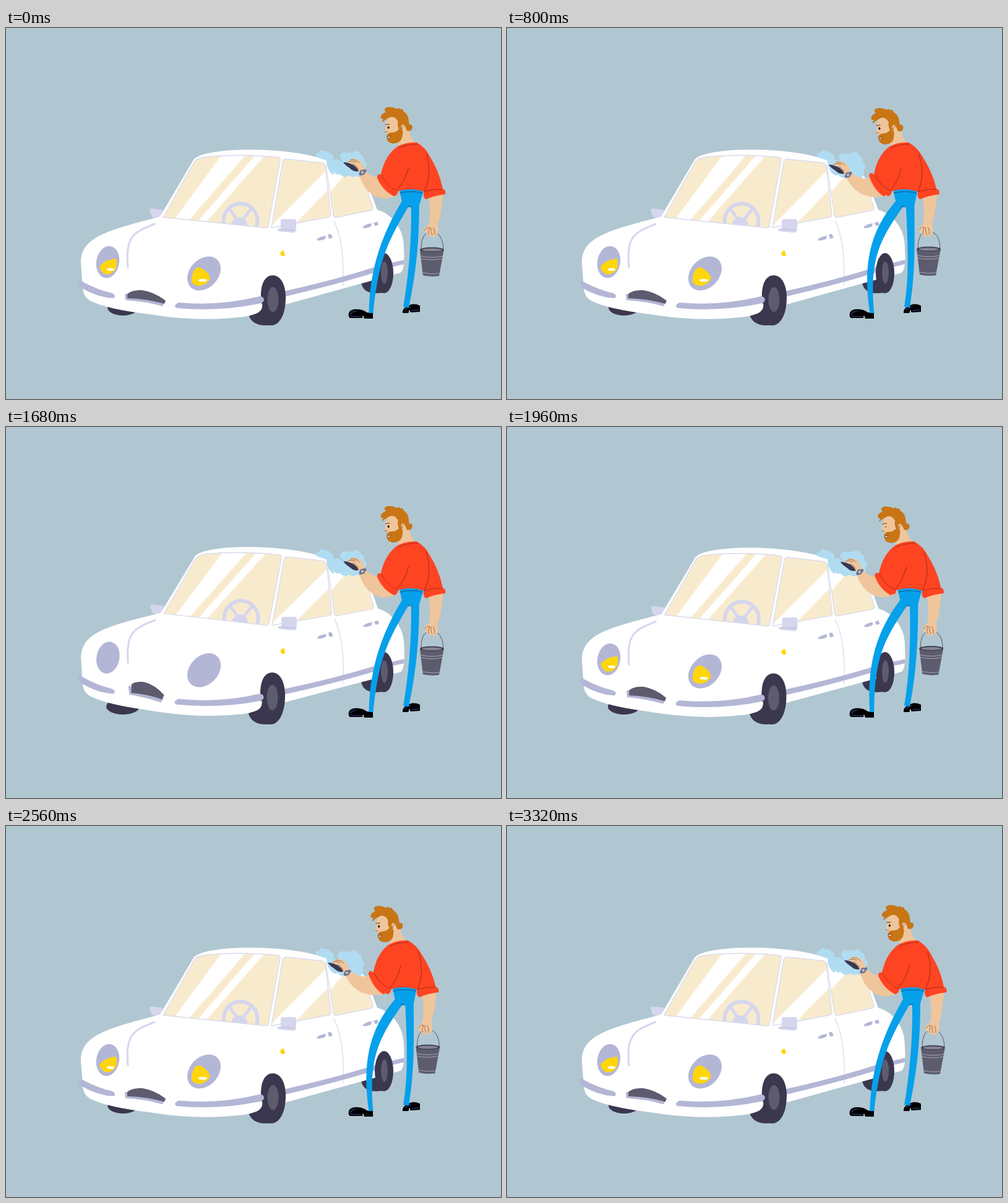
These frames come from a looping animation (800x600 px, 3360 ms). An HTML page:

```html
<!DOCTYPE html>
<html lang="en">
<head>
<meta charset="utf-8">
<title>Car wash</title>
<style>
html, body { margin: 0; width: 100%; height: 100%; overflow: hidden; background: #b0c7d2; }
svg { display: block; width: 100vw; height: 100vh; }
.line { fill: none; stroke-linecap: round; stroke-linejoin: round; }
.tan { fill: #f8ebcd; }
.edge { stroke: #d9daee; stroke-width: 1.3; stroke-linejoin: round; }
.lav { fill: #b4b6d6; }
.pale { fill: #d5d6ee; }
.tire { fill: #3a374e; }
.hub { fill: #5d5b6e; }
.skin { fill: #efc59c; }
.hair { fill: #c87516; }
.fold { stroke: #8f2413; stroke-width: .8; }
.crease { stroke: #8a5a3a; stroke-width: .8; }
</style>
</head>
<body>
<svg viewBox="0 0 800 600">
  <defs>
    <clipPath id="glass"><path d="M254 306 L304 217 Q308 211 320 209 Q375 203 439 209 Q444 210 443 214 L424 320 Q423 324 419 323 Z"/></clipPath>
    <clipPath id="side"><path d="M453 212 L510 218 Q515 219 516 224 L525 301 Q525 305 521 306 L429 323 L447 217 Q448 212 453 212 Z"/></clipPath>
    <clipPath id="rear"><path d="M517 222 L572 241 Q577 243 579 248 L593 290 Q593 294 589 295 L535 306 Q530 307 529 302 Z"/></clipPath>
  </defs>
  <rect width="800" height="600" fill="#b0c7d2"/>

  <!-- car -->
  <ellipse id="farWheel" class="tire" cx="189" cy="452" rx="25" ry="13"/>
  <path class="tire" d="M574 412 Q577 429 598 429 L613 428 L613 395 Z"/>
  <path class="tire" d="M391 460 Q395 481 420 481 L434 480 L432 440 Z"/>
  <g class="car">
    <path class="pale" d="M232 295 Q232 292 236 292 L254 294 L250 307 L236 306 Z"/>
    <path fill="#fff" d="M121 380 C121 338 162 328 249 305 L302 215 C308 199 376 194 432 198 Q478 201 518 213 L568 232 Q582 240 588 262 L600 294 Q622 300 635 323 Q643 336 643 358 Q645 392 637 396 L452 447 L414 452 Q409 463 385 467 Q310 476 232 463 Q165 455 138 442 Q125 436 124 420 Z"/>
    <g clip-path="url(#glass)">
      <path class="tan" d="M240 190H460V340H240Z"/>
      <path fill="#fff" d="M351 202 L390 202 L294 313 L271 311 Z M406 202 L421 203 L320 318 L307 316 Z"/>
      <g class="line" stroke="#d5d6ee" stroke-width="6">
        <ellipse cx="379" cy="312" rx="27.500" ry="28"/>
        <path d="M375 312 L362 294 M381 312 L396 293" stroke-width="5"/>
      </g>
      <circle class="pale" cx="377" cy="319" r="13"/>
    </g>
    <path class="line edge" d="M254 306 L304 217 Q308 211 320 209 Q375 203 439 209 Q444 210 443 214 L424 320 Q423 324 419 323 Z"/>
    <g clip-path="url(#side)">
      <path class="tan" d="M420 200H530V330H420Z"/>
      <path fill="#fff" d="M518 230 L524 258 L466 318 L425 324 Z"/>
    </g>
    <path class="line edge" d="M453 212 L510 218 Q515 219 516 224 L525 301 Q525 305 521 306 L429 323 L447 217 Q448 212 453 212 Z"/>
    <g clip-path="url(#rear)">
      <path class="tan" d="M510 210H600V310H510Z"/>
      <path fill="#fff" d="M512 215 L568 215 L523 266 Z"/>
    </g>
    <path class="line edge" d="M517 222 L572 241 Q577 243 579 248 L593 290 Q593 294 589 295 L535 306 Q530 307 529 302 Z"/>
    <path class="line edge" d="M530 312 Q547 345 545 416"/>
    <path class="line" stroke="#d5d6ee" stroke-width="3" d="M240 317 C205 331 193 337 197 387"/>
    <path class="pale" d="M437 326 L468 323 Q470 331 464 331 L441 329 Z"/>
    <rect class="pale" x="444" y="309" width="25" height="18" rx="4"/>
    <path class="line" stroke="#aeb0cc" stroke-width=".8" d="M440 325 L467 327"/>
    <path class="lav" d="M502 343 Q504 338 517 336 L516 341 Q507 345 502 343 Z M520 334 L525 333 L528 339 L522 341 Z M576 323 Q580 317 591 316 L590 321 Q581 325 576 323 Z M594 315 L600 313 L602 319 L596 320 Z"/>
    <path class="lav" d="M448 426 Q530 408 598 386 Q603 391 598 395 Q530 416 448 435 Z M622 380 L643 375 L643 382 L622 387 Z"/>
    <path fill="#ffd60a" d="M443 365 Q444 360 449 360 L451 368 Q445 371 443 365 Z"/>
    <ellipse class="lav" cx="164.500" cy="378.500" rx="18.500" ry="26" transform="rotate(10 164.500 378.500)"/>
    <ellipse class="lav" cx="320" cy="397" rx="23" ry="31" transform="rotate(43 320 397)"/>
    <g class="lamp" data-base="399">
      <path fill="#ffd60a" d="M151 386 Q160 374 178 373 Q181 384 176 392 Q168 400 160 398 Q153 394 151 386 Z"/>
      <ellipse fill="#fff" cx="169" cy="390.500" rx="6" ry="2.300"/>
    </g>
    <g class="lamp" data-base="417">
      <path fill="#ffd60a" d="M305 390 Q310 386 315 388 Q327 394 330 405 Q325 415 313 417 Q302 417 300 410 Q299 400 305 390 Z"/>
      <ellipse fill="#fff" cx="318" cy="408" rx="7" ry="2.300"/>
    </g>
    <path id="lip" class="lav"/>
    <path id="mouth" class="hub"/>
    <path class="lav" d="M118 410 Q120 407 125 411 Q147 423 172 429 Q179 433 174 437 Q148 436 121 420 Q116 415 118 410 Z"/>
  </g>
  <ellipse class="tire" cx="611" cy="396.500" rx="15" ry="32.500"/>
  <ellipse class="hub" cx="611.500" cy="395.500" rx="5.500" ry="18"/>
  <g id="frontWheel">
    <path class="tire" d="M412 437 C411 413 419 400 431 400 C445 400 452 417 452 436 C452 462 443 481 428 481 C420 481 414 470 412 437 Z"/>
    <ellipse class="hub" cx="431.500" cy="439" rx="9" ry="20"/>
  </g>
  <g class="car">
    <path class="lav" d="M279 444 Q345 450 410 434 Q417 434 417 440 Q416 445 408 446 Q345 459 276 453 Q269 449 279 444 Z"/>
    <path fill="#fff" d="M391 457 L414 445 Q416 457 404 462 L391 466 Z"/>
  </g>

  <!-- foam -->
  <path fill="#b0dcf2" d="M502 209 Q498 201 506 202 Q510 194 516 200 Q523 198 524 204 Q531 205 529 212 L530 238 Q519 232 518 214 Z"/>
  <g id="foam" fill="#b0dcf2"></g>

  <!-- man -->
  <path d="M554 467 Q552 457 562 455 Q576 454 583 460 L593 461 L593 470 L579 470 L578 467 L576 469 L556 469 Z"/>
  <path d="M641 458 Q643 451 650 450 Q654 445 664 447 L669 449 L669 459 L654 460 L652 458 L650 461 L641 461 Z"/>
  <path class="line" stroke="#3d3f9c" stroke-width="1.200" d="M557 463 Q559 458 566 458 M557 466 L574 467 M645 456 Q649 451 654 451 M656 457 L667 456"/>
  <path class="line" stroke="#fff" stroke-width="1.300" d="M577 466 V468 M652 457 V459"/>
  <path id="legs" fill="#06a0eb"/>
  <path id="seam" class="line" stroke="#123f73" stroke-width=".8" d="M637 267 Q655 262 674 267 M650 289 Q653 287 656 290"/>
  <g id="lowArm">
    <path class="skin" d="M683 270 L707 268 Q704 300 697 323 L683 324 Q688 300 683 270 Z"/>
  </g>
  <g id="bucket">
    <path class="line" stroke="#55536a" d="M671 358 Q671 330 688 329 Q706 331 707 358"/>
    <path class="hub" d="M669 358 L674 400 Q687 403 700 401 L708 358 Z"/>
    <ellipse fill="#444257" cx="688.500" cy="358.500" rx="19.500" ry="4"/>
    <ellipse fill="#858493" cx="688.500" cy="358.800" rx="16" ry="2.300"/>
    <path class="line" stroke="#b9b8c6" stroke-width=".8" d="M671 369 Q688 373 706 369 M671 373 Q688 377 705 373 M674 396 Q688 399 700 397"/>
  </g>
  <g id="fist">
    <path class="skin" d="M683 318 Q674 323 677 330 Q679 333 682 333 Q683 338 688 337 Q693 340 695 335 Q699 334 699 327 L698 319 Z"/>
    <path class="line crease" d="M677 327 Q680 321 685 323 Q681 330 684 334 M687 323 Q686 329 689 335 M691 323 Q694 329 693 334"/>
  </g>
  <g id="torso">
    <path class="skin" d="M637 176 L651 162 Q653 176 661 186 Q648 193 634 191 Z"/>
    <path fill="#ff4422" d="M634 191 Q648 184 664 185 Q678 193 685 207 Q701 233 706 260 Q712 262 710 269 Q692 271 679 277 Q673 273 676 265 Q655 257 634 264 Q633 271 627 272 Q607 261 600 243 Q600 236 606 237 Q613 205 634 191 Z"/>
    <path class="line fold" d="M651 226 Q644 250 631 263 Q617 257 607 238 M680 203 Q690 238 676 265 Q690 260 705 261 M635 194 Q648 188 665 188"/>
    <g id="head">
      <path class="skin" d="M617 146 Q614 153 614 160 L612 167 L616 170 L617 180 Q628 185 638 178 L648 164 L642 143 Q628 137 617 146 Z"/>
      <path class="hair" d="M636 163 Q631 169 624 169 Q617 169 616 174 Q614 185 626 187 Q640 186 641 174 Q643 165 640 157 Z"/>
      <path class="hair" d="M606 145 Q606 139 614 136 Q609 130 617 128 Q625 127 632 131 Q635 128 638 132 Q641 129 643 135 Q650 139 651 148 L652 156 Q658 155 657 162 Q655 168 648 166 L645 158 Q641 154 639 158 L636 165 Q632 158 634 151 Q629 142 622 144 Q613 148 608 153 Q608 149 611 147 Q607 148 606 145 Z"/>
      <path class="skin" d="M639 159 Q642 154 645 158 Q646 164 641 167 Z"/>
      <path class="line crease" d="M641 164 Q640 158 644 158 M612 167 Q614 169 617 168"/>
      <path class="line" stroke="#9c4c1a" stroke-width="1.300" d="M614 156 L620 155.500"/>
      <ellipse id="eye" fill="#111" cx="618.500" cy="161" rx="1.500" ry="2"/>
      <path fill="#fff" stroke="#6b2b16" stroke-width=".8" d="M616 175 Q619 177 622 174 Q621 179 617 178 Z"/>
    </g>
  </g>
  <path id="forearm" class="skin"/>
  <path id="cuff" fill="#ff4422"/>
  <g id="hand">
    <path class="tire" d="M545 217 Q556 217 566 225 L571 231 Q563 234 556 227 Q547 221 545 217 Z"/>
    <path class="skin" d="M553 216 Q556 211 566 211 Q578 216 581 231 L572 237 Q569 225 560 220 Q553 219 553 216 Z"/>
    <path class="line crease" d="M553 216 Q559 214 565 217 M557 213 Q566 212 571 218 M560 220 Q566 222 570 228"/>
    <path class="line" stroke="#717895" stroke-width="5" d="M573 236 L580 231"/>
    <circle cx="576" cy="233.500" r="3.800" fill="#858aa6" stroke="#555a78" stroke-width="1"/>
    <circle cx="576" cy="233.500" r="1.700" fill="#c1c6d9"/>
  </g>
</svg>
<script>
const LOOP = 3360, SWAY = 1680, STEP = 40;
const $ = id => document.getElementById(id);
const set = (id, key, value) => $(id).setAttribute(key, value);
const swing = t => (1 - Math.cos(2 * Math.PI * t / SWAY)) / 2;
const ease = (t, a, b) => {
  const x = Math.min(1, Math.max(0, (t - a) / (b - a)));
  return x * x * (3 - 2 * x);
};
const pulse = (t, a, b, c, d) => ease(t, a, b) * (1 - ease(t, c, d));

// Each pair of paths has the same commands: rest pose, then end pose.
const morphs = {
  forearm: ["M571 238 Q578 262 596 272 Q614 280 629 271 L602 240 Q592 244 582 231 Z",
            "M548 241 Q556 260 574 269 Q594 277 614 271 L589 241 Q573 248 559 235 Z"],
  cuff: ["M606 237 Q601 235 600 242 Q608 262 627 272 Q632 271 632 264 Q617 257 606 237 Z",
         "M591 235 Q586 233 585 239 Q592 261 608 272 Q614 272 614 264 Q600 256 591 235 Z"],
  mouth: ["M196 430 Q204 423 220 424 Q240 427 258 441 L256 446 Q228 438 196 437 Z",
          "M203 421 Q209 416 223 417 Q241 421 256 438 L253 445 Q230 437 203 435 Z"],
  lip: ["M192 432 Q194 428 197 431 L199 435 Q230 437 256 444 L253 450 Q225 442 193 440 Z",
        "M198 425 Q200 422 203 425 L204 433 Q230 435 255 444 L251 450 Q226 442 200 438 Z"]
};
for (const id in morphs) {
  const [a, b] = morphs[id];
  const end = b.match(/[\d.]+/g).map(Number);
  morphs[id] = k => {
    let i = 0;
    set(id, "d", a.replace(/[\d.]+/g, n => (+n + (end[i++] - n) * k).toFixed(2)));
  };
}

// Feet stay put, the hips slide and the front knee bends early.
function legs(lean) {
  const h = -12 * lean, k = -28 * lean ** .6;
  return `M${636 + h} 262 Q${655 + h} 257 ${675 + h} 264 L${668 + h * .8} 287
    C${668 + h * .8} 340 ${664 + h * .25} 390 651 452 L642 451
    C651 400 ${656 + h * .75} 340 ${655 + h * .85} 289 L${650 + h * .9} 290
    C${619 + k * .65} 345 ${604 + k * .65} 375 593.500 461 L586.500 461
    C${589 + k * .5} 385 ${613 + k} 330 ${640 + h} 280 Z`;
}

// Foam puffs: x, y, radius.
const puffs = [[534, 221, 9], [547, 208, 7], [556, 211, 10], [566, 206, 7], [571, 213, 8], [576, 222, 7],
  [573, 233, 8], [561, 232, 9], [548, 232, 9], [537, 229, 8], [556, 222, 14]];
$("foam").innerHTML = puffs.map(([x, y, r]) => `<circle cx="${x}" cy="${y}" r="${r}"/>`).join("");

const cars = document.querySelectorAll(".car");
const lamps = document.querySelectorAll(".lamp");

function draw(t) {
  const lean = swing(t + 80), reach = swing(t);
  const lift = pulse(t, 840, 1320, 1700, 2220);
  const yawn = pulse(t, 900, 1300, 1680, 2080);
  const shut = pulse(t, 1000, 1280, 1680, 1980);

  const move = (id, k, x, y) => set(id, "transform", `translate(${x * k} ${y * k})`);
  move("hand", reach, -25, 4);
  move("foam", reach, -4, 1.5);
  move("bucket", lean, -7, -1);
  move("fist", lean, -10.5, -.5);
  move("lowArm", lean, -11.5, -.5);
  move("seam", lean, -12, 0);
  morphs.forearm(reach);
  morphs.cuff(lean);
  set("legs", "d", legs(lean));
  set("torso", "transform", `matrix(1 0 ${.04 * lean} 1 ${-22.5 * lean} 0)`);
  set("head", "transform", `translate(0 ${.8 * lean}) rotate(${-1.5 * lean} 650 185)`);
  set("eye", "ry", t >= 1900 && t < 2040 ? .5 : 2);

  cars.forEach(c => c.setAttribute("transform", `rotate(${.7 * lift} 620 400)`));
  const grow = .037 * lift;
  set("frontWheel", "transform", `translate(${-lift} ${-481 * grow}) scale(1 ${1 + grow})`);
  set("farWheel", "rx", 25 + 2 * lift);
  lamps.forEach(l => l.setAttribute("transform", `translate(0 ${l.dataset.base * shut}) scale(1 ${1 - shut})`));
  morphs.mouth(yawn);
  morphs.lip(yawn);
}

const start = performance.now();
function tick() {
  const t = (performance.now() - start) % LOOP;
  draw(Math.floor(t / STEP) * STEP);
  requestAnimationFrame(tick);
}
tick();
</script>
</body>
</html>
```
